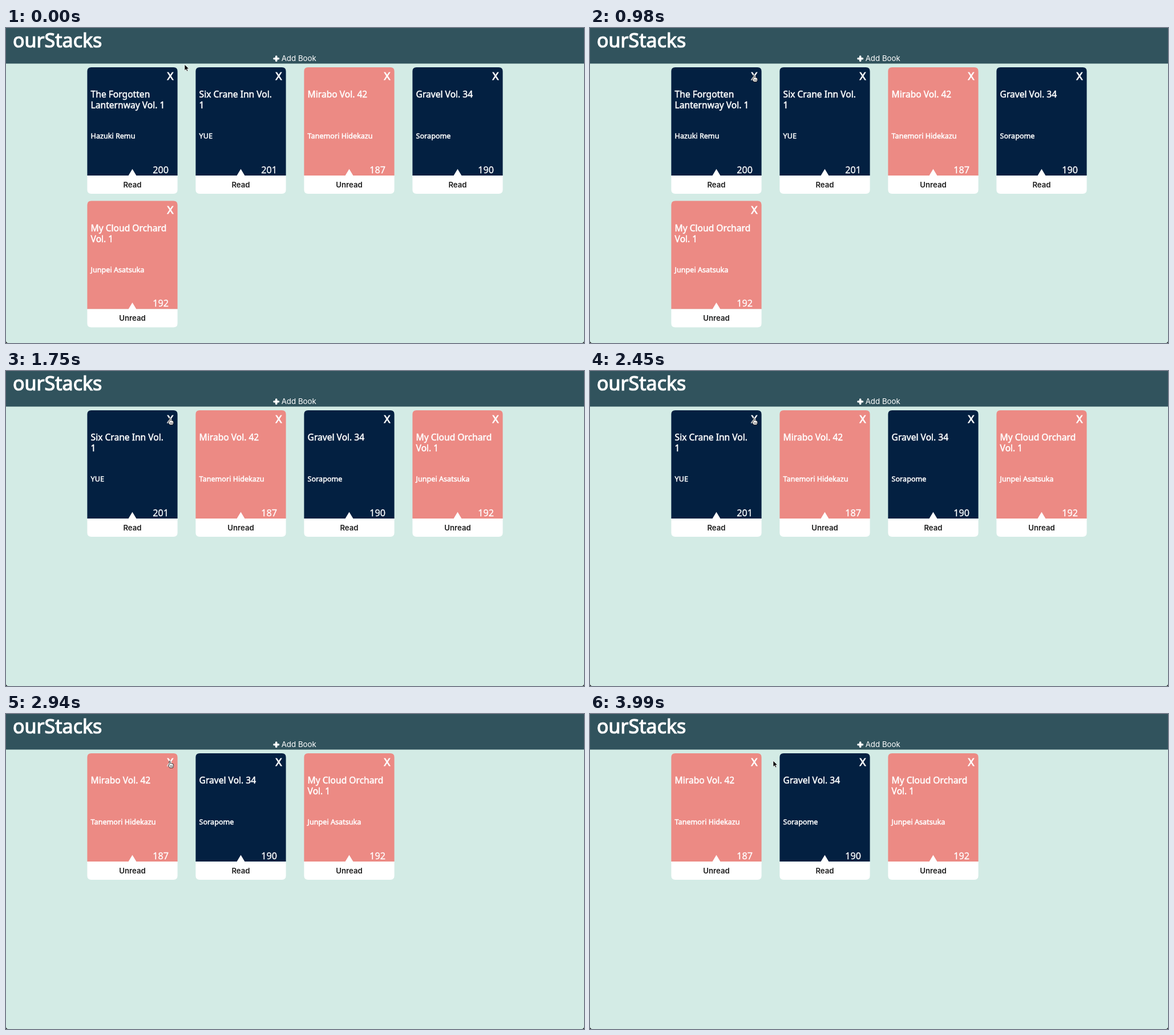
An HTML page for the animation above (4.06 s loop, 1013x553 px).

```html
<!DOCTYPE html>
<html lang="en">
<head>
<meta charset="utf-8">
<style>
  html, body { margin: 0; width: 100%; height: 100%; overflow: hidden; background: #000; }
  svg { display: block; }
  text { fill: #fff; stroke: #fff; stroke-width: .5px; font: 400 15.6px "Noto Sans", "Open Sans", sans-serif; }
  .logo { font-size: 34px; stroke-width: 1.2px; }
  .add { font: 400 13.3px Inter, sans-serif; stroke: none; }
  .author { font-size: 12.6px; }
  .pages { font-size: 16.2px; text-anchor: end; stroke-width: .3px; }
  .close { font-size: 18.6px; text-anchor: middle; stroke-width: .9px; }
  .status { fill: #1c1c1c; stroke: none; font: 600 13.2px Inter, sans-serif; text-anchor: middle; }
</style>
</head>
<body>
<svg width="1013" height="553" viewBox="0 0 1013 553">
  <path d="M0 0H1013V549Q1013 553 1009 553H4Q0 553 0 549Z" fill="#d3ebe5"/>
  <path d="M0 0H1013V62.5H0Z" fill="#31535d"/>
  <text class="logo" x="12" y="34">ourStacks</text>
  <path d="M473.7 50V57.5M470 53.7H477.5" stroke="#fff" stroke-width="3.6" stroke-linecap="round"/>
  <text class="add" x="482.7" y="58.3">Add Book</text>
  <g id="cards"></g>
  <g id="cursor">
    <path id="arrow" d="M0 0V10.6L2.5 8.4 4.1 12 5.9 11.2 4.3 7.7H7.6Z" stroke="#fff" stroke-width=".7"/>
    <g id="hand" stroke="#000" stroke-width=".8" stroke-linejoin="round">
      <path d="M-1 1.2Q0-.6 1 1.2V5Q2 4 3 5.2 4 4.4 5 5.7 6.4 5 6.4 7V9.5L5.3 12.6H0L-2.8 8.5Q-3 7-1 8Z" fill="#fff"/>
      <path d="M1 8V11M2.7 8V11M4.4 8V11" stroke-width=".6"/>
    </g>
  </g>
</svg>
<script>
const LOOP = 4060;
const REMOVALS = [1750, 2940];
const books = [
  { title: ["The Forgotten", "Lanternway Vol. 1"], author: "Hazuki Remu", pages: 200, read: true },
  { title: ["Six Crane Inn Vol.", "1"], author: "YUE", pages: 201, read: true },
  { title: ["Mirabo Vol. 42"], author: "Tanemori Hidekazu", pages: 187 },
  { title: ["Gravel Vol. 34"], author: "Sorapome", pages: 190, read: true },
  { title: ["My Cloud Orchard", "Vol. 1"], author: "Junpei Asatsuka", pages: 192 }
];

const byId = id => document.getElementById(id);
const show = (el, on) => el.setAttribute("display", on ? "inline" : "none");
const moveTo = (el, x, y) => el.setAttribute("transform", `translate(${x} ${y})`);

const cardMarkup = ({ title, author, pages, read }) => `<g>
  <path d="M0 190V7Q0 0 7 0H151.2Q158.2 0 158.2 7V190Z" fill="${read ? "#032041" : "#ec8a84"}"/>
  <path d="M0 190H72.2L79.1 178.5 86 190H158.2V215Q158.2 222 151.2 222H7Q0 222 0 215Z" fill="#fff"/>
  <text class="close" x="145.5" y="22.1">X</text>
  ${title.map((line, i) => `<text x="6.2" y="${53.4 + i * 19}">${line}</text>`).join("")}
  <text class="author" x="6.2" y="125.2">${author}</text>
  <text class="pages" x="142.7" y="185.6">${pages}</text>
  <text class="status" x="79.1" y="210.5">${read ? "Read" : "Unread"}</text>
</g>`;

byId("cards").innerHTML = books.map(cardMarkup).join("");
const cards = [...byId("cards").children];

function ease(t, start, end) {
  const p = Math.min(1, Math.max(0, (t - start) / (end - start)));
  return p * p * (3 - 2 * p);
}

function draw(now) {
  const t = now % LOOP;
  const removed = REMOVALS.filter(time => t >= time).length;
  cards.forEach((card, i) => {
    const slot = i - removed;
    show(card, slot >= 0);
    if (slot >= 0) moveTo(card, 142.4 + slot % 4 * 190, 69 + Math.floor(slot / 4) * 234.5);
  });

  const enter = ease(t, 350, 910), leave = ease(t, 3430, 3950);
  const x = 313 - 26 * enter + 34 * leave;
  const y = 64 + 18 * enter;
  const hovering = x < 296;
  moveTo(byId("cursor"), x, y);
  show(byId("hand"), hovering);
  show(byId("arrow"), !hovering);
  requestAnimationFrame(draw);
}
requestAnimationFrame(draw);
</script>
</body>
</html>
```
